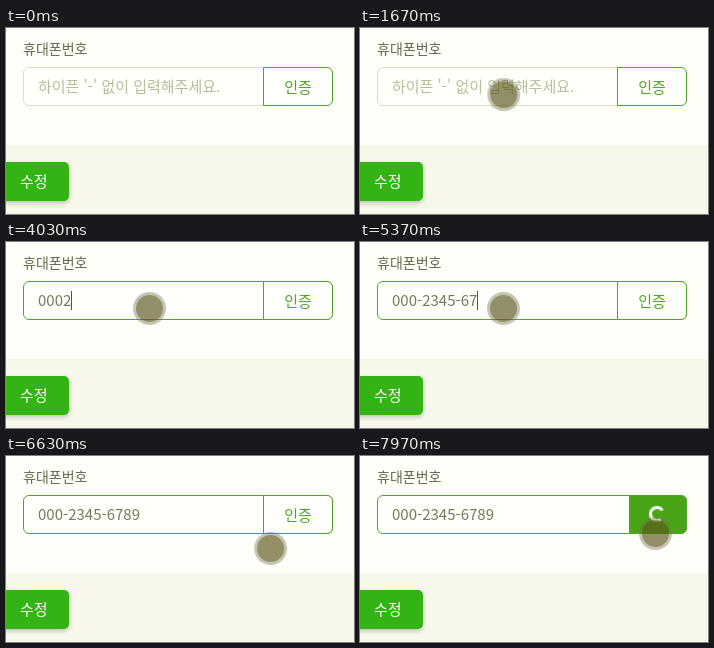
Write an HTML page that moves like this. It is 348x186 px and loops after 8 s.

```html
<!DOCTYPE html>
<html lang="ko">
<head>
<meta charset="utf-8">
<title>휴대폰번호 인증</title>
<style>
  :root { --green: #50a62a; --loop: 8s linear infinite both; }
  html, body { margin: 0; width: 100%; height: 100%; overflow: hidden; }
  body {
    position: relative;
    background: linear-gradient(#fffffa 117.5px, #f8f8ea 117.5px);
    font: 15px "Noto Sans CJK KR", "Noto Sans CJK", "Noto Sans KR", "Noto Sans", sans-serif;
  }
  body *, body *::before { position: absolute; box-sizing: border-box; white-space: pre; }

  .label { left: 17px; top: 10px; font-size: 14px; line-height: 21px; font-weight: 500; color: #66674e; }

  .field {
    left: 17px; top: 39px; width: 310px; height: 39px;
    border: 1px solid; border-radius: 6px; background: #fffffb;
    animation: focus var(--loop);
  }
  .hint, .entry { left: 32px; top: 39px; line-height: 38px; }
  .hint { color: #babc9b; animation: nudge var(--loop); }
  .entry { color: #77785c; }
  .entry > * { position: static; }
  .caret {
    display: inline-block; width: 1px; height: 19px; margin-right: -1px;
    vertical-align: -4px; background: #55563f;
  }

  .verify {
    right: auto; left: 257px; top: 39px; width: 70px; height: 39px;
    border: 1px solid var(--green); border-radius: 0 6px 6px 0;
    line-height: 37px; text-align: center;
    animation: verify var(--loop);
  }
  .verify span { inset: 0; animation: hide-text var(--loop); }
  .spinner {
    left: 289px; top: 50px; width: 16px; height: 16px;
    border: 3px solid #fbfff2; border-right-color: transparent; border-radius: 50%;
    animation: spin 1s linear infinite, show-spinner var(--loop);
  }

  .save {
    left: -8px; top: 134px; width: 71px; height: 39px; padding-left: 22px;
    border-radius: 5px; background: #34b315; color: #fff;
    font-weight: 500; line-height: 38px;
    box-shadow: 0 2px 4px rgba(70, 90, 90, .35);
  }

  .pointer {
    left: -16.5px; top: -16.5px; width: 33px; height: 33px; border-radius: 50%;
    background: radial-gradient(circle, rgba(90, 86, 28, .66) 13px, rgba(110, 110, 80, .4) 14px);
    animation: point var(--loop);
  }

  @keyframes focus {
    0%, 26.8% { border-color: #dcdfc4; }
    28.5%, 100% { border-color: var(--green); }
  }
  @keyframes nudge {
    0%, 26.8% { transform: none; animation-timing-function: ease; }
    29.3%, 100% { transform: translateX(5px); }
  }
  @keyframes verify {
    0%, 86% { background: #fffffb; color: var(--green); left: 257px; width: 70px; }
    88%, 92.49% { background: #49a517; color: #fff; left: 257px; width: 70px; }
    92.5%, 100% { background: #49a517; color: #fff; left: 269px; width: 58px; }
  }
  @keyframes hide-text { 0%, 92.49% { opacity: 1; } 92.5%, 100% { opacity: 0; } }
  @keyframes show-spinner { 0%, 92.49% { opacity: 0; } 92.5%, 100% { opacity: 1; } }
  @keyframes spin { from { transform: rotate(20deg); } to { transform: rotate(380deg); } }
  @keyframes point {
    0%, 12% { transform: translate(368px, 160px); }
    12.875% { transform: translate(347px, 150px); animation-timing-function: cubic-bezier(.2, .3, .4, 1); }
    21.25%, 74% { transform: translate(143px, 66px); animation-timing-function: ease-in-out; }
    82.875% { transform: translate(264px, 92px); animation-timing-function: ease-out; }
    89%, 100% { transform: translate(295px, 77px); }
  }
</style>
</head>
<body>
  <div class="label">휴대폰번호</div>
  <div class="field"></div>
  <div class="hint">하이픈 '-' 없이 입력해주세요.</div>
  <div class="entry"><span class="value"></span><i class="caret"></i></div>
  <div class="verify"><span>인증</span></div>
  <div class="spinner"></div>
  <div class="save">수정</div>
  <div class="pointer"></div>

<script>
  const LOOP = 8000, BLINK = 530;
  const FOCUS = 2150, BLUR = 7400;
  const DIGITS = "00023456789";
  const KEY_TIMES = [...DIGITS].map((_, i) => i < 9 ? 3150 + i * 270 : 5310 + (i - 8) * 205);

  const find = selector => document.querySelector(selector);
  const hint = find(".hint"), value = find(".value"), caret = find(".caret");

  // Hyphens appear only once the number outgrows four digits.
  function format(digits) {
    if (digits.length < 5) return digits;
    return [digits.slice(0, 3), digits.slice(3, 7), digits.slice(7)].filter(Boolean).join("-");
  }

  function render(t) {
    const count = KEY_TIMES.filter(time => time <= t).length;
    const lastInput = count ? KEY_TIMES[count - 1] : FOCUS;
    const focused = t >= FOCUS && t < BLUR;
    const lit = Math.floor((t - lastInput) / BLINK) % 2 === 0;
    const text = format(DIGITS.slice(0, count));
    if (value.textContent !== text) value.textContent = text;
    hint.style.visibility = count ? "hidden" : "visible";
    caret.style.visibility = focused && lit ? "visible" : "hidden";
  }

  const start = performance.now();
  function tick() {
    render((performance.now() - start) % LOOP);
    requestAnimationFrame(tick);
  }
  tick();
</script>
</body>
</html>
```
